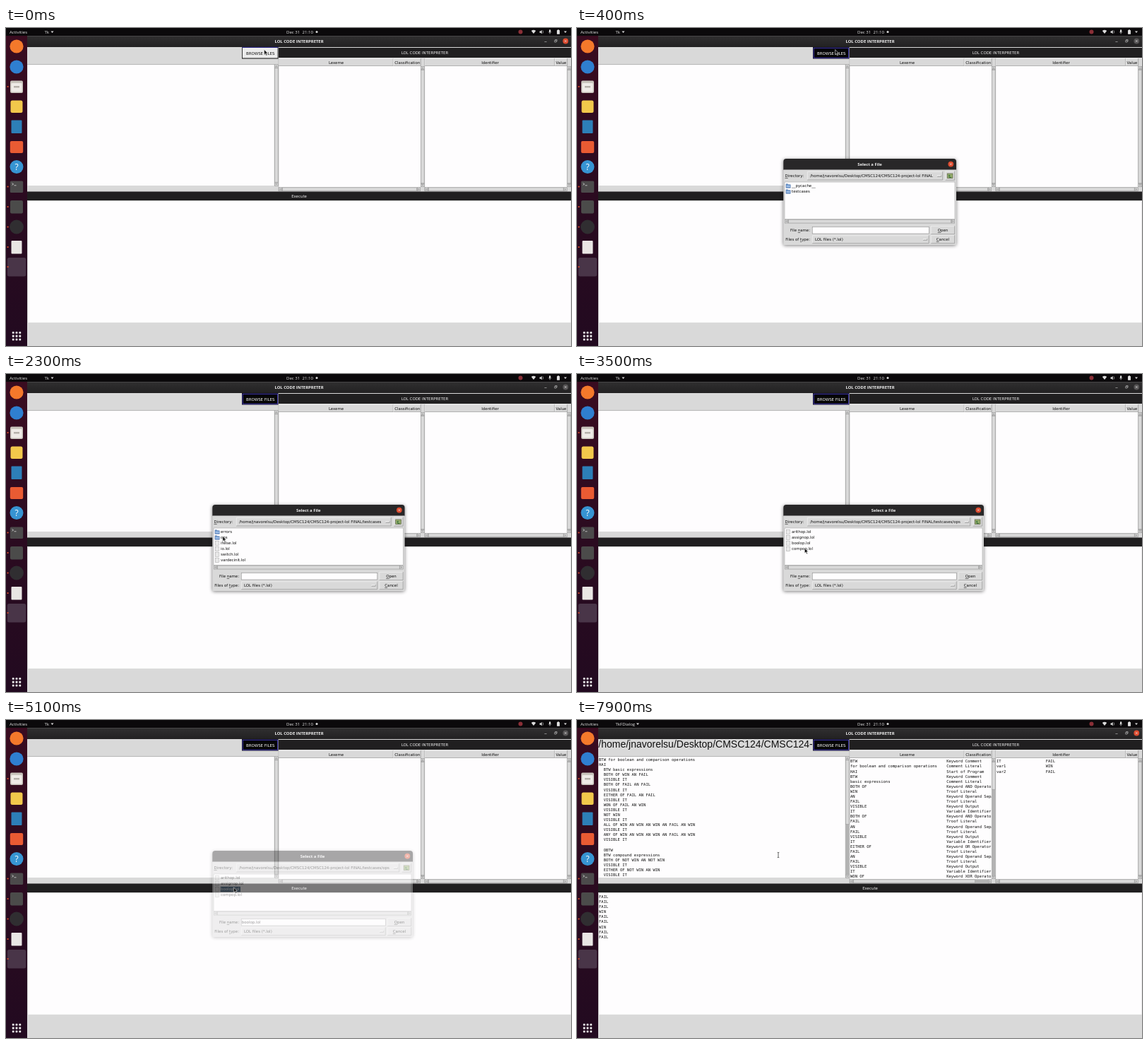
These frames come from a looping animation (800 by 450 pixels, 8000 ms). An HTML page:

```html
<!DOCTYPE html>
<html lang="en">
<head>
<meta charset="utf-8">
<title>Interpreter session</title>
<style>
html, body { margin: 0; width: 100%; height: 100%; overflow: hidden; background: #d9d9d9; }
svg { display: block; width: 800px; height: 450px; }
text { white-space: pre; font-family: "DejaVu Sans", sans-serif; font-size: 5.45px; }
.shell { font-family: "Open Sans", sans-serif; font-size: 6.1px; }
.bold { font-family: "Open Sans", sans-serif; font-size: 5.9px; font-weight: 700; }
.mono { font-family: "DejaVu Sans Mono", monospace; font-size: 5.52px; }
.big { font-family: "Liberation Sans", sans-serif; font-size: 14px; }
.help { font-family: "Open Sans", sans-serif; font-size: 12px; }
.u { text-decoration: underline; text-decoration-thickness: .5px; }
</style>
</head>
<body>
<svg id="stage" viewBox="0 0 800 450"></svg>
<script>
const LOOP = 8000, GREY = '#d9d9d9', DARK = '#201f20', PAPER = '#fefdfe', ROW = 7.087;
const HOME = '/home/jnavorelsu/Desktop/CMSC124/CMSC124-project-lol FINAL';

const rect = (x1, y1, x2, y2, fill, more = '') =>
  `<rect x="${x1}" y="${y1}" width="${x2 - x1}" height="${y2 - y1}" fill="${fill}" ${more}/>`;
const circle = (x, y, r, fill) => `<circle cx="${x}" cy="${y}" r="${r}" fill="${fill}"/>`;
const path = (d, stroke, width = .7, fill = 'none') =>
  `<path d="${d}" stroke="${stroke}" stroke-width="${width}" fill="${fill}"/>`;
const label = (x, y, s, fill = '#111', cls = '', anchor = 'start') =>
  `<text x="${x}" y="${y}" fill="${fill}" class="${cls}" text-anchor="${anchor}">${s}</text>`;
const mid = (x, y, s, fill, cls) => label(x, y, s, fill, cls, 'middle');
const lines = (x, y, list) => list.map((s, i) => label(x, y + i * ROW, s, '#111', 'mono')).join('');
const underline = s => s.replace(/_(.)/, '<tspan class="u">$1</tspan>');

// Raised grey box
const bevel = (x1, y1, x2, y2) => rect(x1, y1, x2, y2, GREY) +
  path(`M${x1} ${y2 - .3}H${x2 - .3}V${y1}`, '#858585', .6) +
  path(`M${x1 + .3} ${y2 - .6}V${y1 + .3}H${x2 - .6}`, '#f6f6f6', .6);

// Scrollbars: the thumb runs from the first arrow to `end`
const part = (x1, y1, x2, y2) => rect(x1 + .3, y1 + .3, x2 - .3, y2 - .3, GREY, 'stroke="#999" stroke-width=".6"');
const vbar = (x, y1, y2, end = y2 - 5) => rect(x, y1, x + 5.5, y2, '#b3b3b3') +
  part(x, y1, x + 5.5, y1 + 5) + part(x, y2 - 5, x + 5.5, y2) + part(x, y1 + 5, x + 5.5, end) +
  path(`M${x + 1.5} ${y1 + 3.3}l1.3 -1.6 1.3 1.6zM${x + 1.5} ${y2 - 3.3}l1.3 1.6 1.3 -1.6z`, '#666', .4);
const hbar = (y, x1, x2, end = x2 - 5) => rect(x1, y, x2, y + 5.5, '#b3b3b3') +
  part(x1, y, x1 + 5, y + 5.5) + part(x2 - 5, y, x2, y + 5.5) + part(x1 + 5, y, end, y + 5.5) +
  path(`M${x1 + 3.2} ${y + 1.5}l-1.6 1.3 1.6 1.3zM${x2 - 3.2} ${y + 1.5}l1.6 1.3 -1.6 1.3z`, '#666', .4);

const caret = x => `<path d="M${x - 2} 4.6h4l-2 2.4z" fill="#ddd"/>`;
const closeButton = (x, y, fill = '#dd4b2f') => circle(x, y, 3.9, fill) +
  path(`M${x - 1.3} ${y - 1.3}l2.6 2.6m0 -2.6l-2.6 2.6`, '#eee', .7);

function dock() {
  const dots = [83, 224.5, 253, 281.5, 310, 338].map(y => circle(2.6, y, 1.1, '#e2502e')).join('');
  let grid = '';
  for (let i = 0; i < 9; i++) {
    const x = 8.8 + i % 3 * 4.8, y = 429.8 + Math.floor(i / 3) * 4.8;
    grid += rect(x, y, x + 2.8, y + 2.8, '#eee', 'rx=".6"');
  }
  return rect(0, 11, 30, 450, 'url(#dock)') +
    circle(15, 26, 9.6, '#f4792b') +
    circle(15, 55, 9.6, '#2f7fd0') +
    rect(6, 74.5, 24, 92, '#c9c4bc', 'rx="2"') + rect(7.5, 78, 22.5, 90.5, '#efebe7', 'rx="1"') + rect(11, 82, 19, 84.5, '#b5b0aa') +
    rect(6.5, 102.5, 23.5, 120, '#f2c84b', 'rx="2.5"') +
    rect(7.5, 130.5, 22.5, 149, '#2d7fb8', 'rx="1"') +
    rect(5.8, 160, 24.2, 177, '#e95b33', 'rx="2"') +
    circle(15, 196.5, 9.5, '#3794d2') + mid(15, 200.8, '?', '#fff', 'help') +
    rect(5.8, 216.5, 24.2, 233, '#4c4a4b', 'rx="1.5"') + path('M8.5 219.5l2 1.4 -2 1.4M11.5 222.8h3', '#eee') +
    rect(6, 244, 24, 262.5, '#4b4b4a', 'rx="2"') +
    circle(15, 281.5, 9.9, '#302e31') +
    rect(7.5, 301, 22.5, 319.5, '#e9e6e4', 'rx="1"') +
    rect(1.8, 325, 28.2, 351.5, '#493548', 'rx="2.5"') + dots + grid;
}

const topBar = () => rect(0, 0, 800, 11.5, '#0b090b') + label(5, 7.8, 'Activities', '#e6e6e6', 'shell') +
  '<g id="app"></g>' + label(397, 7.8, 'Dec 31  21:10', '#e6e6e6', 'shell') + circle(440, 5.4, 1.5, '#ddd') +
  circle(728.5, 5.5, 3, '#8a2f37') +
  '<path d="M743.8 4q3.2 -2.4 6.4 0l-3.2 4z" fill="#ddd"/>' +
  '<path d="M755.5 4.5h1.4l1.8 -1.6v5.4l-1.8 -1.6h-1.4z" fill="#ddd"/>' + path('M760 3.5q1.4 2 0 4', '#ddd', .6) +
  rect(769, 2.3, 771.2, 6.3, '#ddd', 'rx="1"') + path('M768 5.2q2.1 4 4.2 0M770.1 7v1.5', '#ddd', .5) +
  rect(780, 3, 784, 8.7, '#ddd', 'rx=".5"') + rect(781.2, 2.2, 782.8, 3, '#ddd') + caret(792);

const titleBar = () => rect(30, 11.5, 800, 27, 'url(#title)') + mid(415, 20.8, 'LOL CODE INTERPRETER', '#f0f0f0', 'bold') +
  path('M762.4 19.5h3.2M776.7 17.6h2.4v2.4h-2.4zM777.7 17.4v-.9h2.4v2.4h-.9', '#c8c8c8', .6) + '<g id="close"></g>';

function panes() {
  const header = (x1, x2) => bevel(x1, 43, x2, 54);
  return rect(30, 27, 800, 450, GREY) + rect(30.5, 51.5, 379.5, 223, PAPER) + path('M30 51.6H380', '#8d8d8d', .6) +
    rect(386, 28, 800, 42, DARK) + mid(593, 37.2, 'LOL CODE INTERPRETER', '#eee') +
    header(386, 548.5) + header(548.5, 587.5) + header(593, 777) + header(777, 795) +
    mid(467.5, 50.7, 'Lexeme') + mid(568.3, 50.7, 'Classification') + mid(685.5, 50.7, 'Identifier') + mid(786, 50.7, 'Value') +
    rect(386, 54, 587, 225, PAPER) + rect(593, 54, 794.5, 225, PAPER) +
    path('M386 43V231M592.7 43V231', '#999', .5) +
    '<g id="bars"></g>' + vbar(794.5, 54, 225) + hbar(225.5, 593, 794.5) +
    rect(30, 231.5, 800, 244, DARK) + mid(415, 240.1, 'Execute', '#eee') +
    rect(30.5, 245, 799.5, 416.8, PAPER) + path('M30.3 417V245', '#aaa', .5);
}

const bars = full => full
  ? vbar(380, 51.5, 223.5, 148) + vbar(587, 54, 225, 98.5) + hbar(225.5, 386, 587, 564)
  : vbar(380, 51.5, 223.5) + vbar(587, 54, 225) + hbar(225.5, 386, 587);

const browse = hot => rect(334, 27, 385.5, 43.5, '#0a0a0a') + (hot
  ? rect(334.8, 28, 384.6, 42.5, '#ececec') + path('M334 27.4H385.5', '#3530a8', .9)
  : rect(335.2, 28.3, 384.6, 42.3, '#060606', 'stroke="#4038b4"')) +
  mid(360.2, 37.5, 'BROWSE FILES', hot ? '#111' : '#fff');

const CODE = `BTW for boolean and comparison operations
HAI
  BTW basic expressions
  BOTH OF WIN AN FAIL
  VISIBLE IT
  BOTH OF FAIL AN FAIL
  VISIBLE IT
  EITHER OF FAIL AN FAIL
  VISIBLE IT
  WON OF FAIL AN WIN
  VISIBLE IT
  NOT WIN
  VISIBLE IT
  ALL OF WIN AN WIN AN WIN AN FAIL AN WIN
  VISIBLE IT
  ANY OF WIN AN WIN AN WIN AN FAIL AN WIN
  VISIBLE IT

  OBTW
  BTW compound expressions
  BOTH OF NOT WIN AN NOT WIN
  VISIBLE IT
  EITHER OF NOT WIN AN WIN
  VISIBLE IT`.split('\n');
const LEXEMES = ('BTW,for boolean and comparison operations,HAI,BTW,basic expressions,BOTH OF,WIN,AN,FAIL,VISIBLE,IT,' +
  'BOTH OF,FAIL,AN,FAIL,VISIBLE,IT,EITHER OF,FAIL,AN,FAIL,VISIBLE,IT,WON OF').split(',');
const KINDS = {
  BTW: 'Keyword Comment', HAI: 'Start of Program', 'BOTH OF': 'Keyword AND Operator', 'EITHER OF': 'Keyword OR Operator',
  'WON OF': 'Keyword XOR Operator', WIN: 'Troof Literal', FAIL: 'Troof Literal', AN: 'Keyword Operand Separator',
  VISIBLE: 'Keyword Output', IT: 'Variable Identifier'
};
const results = () => `<g clip-path="url(#pathClip)">${label(30.3, 38.6, HOME, '#111', 'big')}</g>` +
  lines(31, 58, CODE) + lines(387, 60.4, LEXEMES) +
  `<g clip-path="url(#kindClip)">${lines(523.2, 60.4, LEXEMES.map(s => KINDS[s] || 'Comment Literal'))}</g>` +
  lines(594, 60.4, ['IT', 'var1', 'var2']) + lines(663.7, 60.4, ['FAIL', 'WIN', 'FAIL']) +
  lines(31, 252, 'FAIL FAIL FAIL WIN FAIL FAIL WIN FAIL FAIL'.split(' '));

const FOLDERS = {
  root: { right: 537, path: HOME, rows: ['__pycache__', 'testcases'] },
  tests: { right: 564.5, path: HOME + '/testcases', rows: ['errors', 'ops', 'ifelse.lol', 'io.lol', 'switch.lol', 'vardecinit.lol'] },
  ops: { right: 576, path: HOME + '/testcases/ops', rows: ['arithop.lol', 'assignop.lol', 'boolop.lol', 'compop.lol'] }
};

function fileRow(name, i, picked) {
  const y = 223.5 + i * 8, isFile = name.endsWith('.lol');
  const icon = isFile
    ? rect(296.3, y - 3, 301.3, y + 3, '#f4f4f4', 'stroke="#a2a2a2" stroke-width=".6"') + path(`M297.5 ${y - 1}h2.7m-2.7 2h2.7`, '#bbb', .5)
    : `<path d="M296 ${y - 2.7}h2.5l.8 1h2.9v4.4h-6.2z" fill="#6f9bd1" stroke="#3a5f94" stroke-width=".5"/>` + rect(296.6, y - .4, 301.8, y + 1.3, '#a9c6ea');
  const width = name.length * 2.75;
  return icon + (picked ? rect(303.6, y - 3.7, 304.4 + width, y + 3.7, '#4a6984') : '') +
    label(304, y + 1.8, name, picked ? '#fff' : '#111');
}

function dialog(key, picked) {
  const { right: r, path: dir, rows } = FOLDERS[key];
  const chosen = rows[picked] && rows[picked].endsWith('.lol') ? rows[picked] : '';
  const button = (y, s) => bevel(r - 36, y, r - 2, y + 12) + mid(r - 19, y + 8, underline(s));
  return rect(292, 186, r, 308, '#000', 'rx="3" opacity=".5" filter="url(#blur)"') +
    `<path d="M292.3 201v-12q0 -4 4 -4H${r - 4}q4 0 4 4v12z" fill="#282728"/>` + rect(292.3, 200.5, r, 307, GREY) +
    mid((292 + r) / 2, 195.2, 'Select a File', '#f2f2f2', 'bold') + closeButton(r - 7.7, 192.6) +
    label(294.5, 211, underline('_Directory:')) + bevel(326, 203, r - 19, 215.3) + label(330, 211, dir) + bevel(r - 27, 208.3, r - 21, 210.7) +
    bevel(r - 15.5, 202.5, r - 2, 215.5) + rect(r - 12.8, 206, r - 5, 212.5, '#93ab6b', 'stroke="#50553a" stroke-width=".6"') +
    path(`M${r - 7} 211.5h-2.8v-3.3m-1.3 1.3l1.3 -1.4 1.3 1.4`, '#2f6b35', .9) +
    rect(294, 218, r - 2, 270.5, PAPER, 'stroke="#9a9a9a" stroke-width=".5"') + rows.map((s, i) => fileRow(s, i, i === picked)).join('') +
    hbar(270.8, 294, r - 2) +
    label(330, 288, underline('File _name:'), '#111', '', 'end') + rect(333.2, 281.3, r - 38.7, 291, PAPER, 'stroke="#898989" stroke-width=".6"') +
    label(333.8, 288, chosen) + button(280, '_Open') +
    label(330, 301, underline('Files of _type:'), '#111', '', 'end') + bevel(333, 293.5, r - 38.5, 305) +
    label(337, 301, 'LOL files (*.lol)') + bevel(r - 47, 298.2, r - 41, 300.6) + button(293, '_Cancel');
}

const ARROW = '<path d="M0 0V7.2L1.7 5.7 2.9 8.4 4.1 7.9 2.9 5.3H5.1Z" fill="#111" stroke="#fff" stroke-width=".5"/>';
const IBEAM = path('M-1.3 -3.7q1.3 0 1.3 .8V2.9q0 .8 -1.3 .8M1.3 -3.7q-1.3 0 -1.3 .8M0 2.9q0 .8 1.3 .8', '#222', .7);

// [start ms, folder, picked row, dialog opacity]
const SCENES = [
  [0], [200, 'root', -1, .6], [300, 'root', -1, 1], [1300, 'root', 1, 1], [1500, 'tests', -1, 1],
  [2600, 'tests', 1, 1], [2800, 'ops', -1, 1], [4300, 'ops', 2, 1], [5100, 'ops', 2, .4], [5200], [5600]
];
// [ms, x, y]
const POINTER = [
  [0, 365.5, 30.5], [400, 365.5, 30.5], [900, 325, 213], [1100, 322, 228.5], [1500, 322, 228.5], [2100, 308, 229.5],
  [2300, 306.8, 229.5], [2900, 306.8, 229.5], [3400, 321.5, 245], [3500, 322.3, 246.3], [3600, 322.3, 246.3],
  [4000, 322.3, 236.8], [7800, 322.3, 236.8], [7900, 285, 191]
];

document.getElementById('stage').innerHTML = `<defs>
  <linearGradient id="dock" x2="0" y2="1"><stop stop-color="#3a0c20"/><stop offset=".5" stop-color="#2b0b20"/><stop offset="1" stop-color="#220a20"/></linearGradient>
  <linearGradient id="title" x2="0" y2="1"><stop stop-color="#302f30"/><stop offset="1" stop-color="#222122"/></linearGradient>
  <clipPath id="pathClip">${rect(30, 27, 333.5, 44)}</clipPath>
  <clipPath id="kindClip">${rect(520, 54, 587, 225)}</clipPath>
  <filter id="blur" x="-10%" y="-15%" width="120%" height="130%"><feGaussianBlur stdDeviation="2.8"/></filter>
</defs>${panes()}${titleBar()}${topBar()}${dock()}
<g id="browse"></g><g id="results">${results()}</g><g id="dialog"></g><g id="pointer"></g>`;

const $ = id => document.getElementById(id);

function setScene([start, folder, picked, opacity]) {
  const loaded = start >= 5600, returned = start >= 5200, name = returned ? 'TkFDialog' : 'Tk';
  $('app').innerHTML = label(54.5, 7.8, name, '#e6e6e6', 'shell') + caret(returned ? 86 : 65.5);
  $('close').innerHTML = closeButton(792.3, 18.5, folder ? '#565455' : undefined);
  $('bars').innerHTML = bars(loaded);
  $('browse').innerHTML = browse(start < 200);
  $('dialog').innerHTML = folder ? dialog(folder, picked) : '';
  $('dialog').setAttribute('opacity', opacity || 1);
  $('results').setAttribute('visibility', loaded ? 'visible' : 'hidden');
}

function pointerAt(t) {
  const i = POINTER.findIndex(p => p[0] > t);
  if (i < 0) return POINTER[POINTER.length - 1].slice(1);
  const [a, b] = [POINTER[i - 1], POINTER[i]], k = (t - a[0]) / (b[0] - a[0]);
  return [1, 2].map(j => a[j] + (b[j] - a[j]) * k);
}

let scene, beam;
function draw(now) {
  const t = Math.floor(now % LOOP / 100) * 100;
  const next = SCENES.filter(s => s[0] <= t).pop();
  if (next !== scene) setScene(scene = next);
  if (beam !== t >= 7900) {
    beam = t >= 7900;
    $('pointer').innerHTML = beam ? IBEAM : ARROW;
  }
  $('pointer').setAttribute('transform', `translate(${pointerAt(t)})`);
}

let origin;
function tick(now) {
  origin ??= now;
  draw(now - origin);
  requestAnimationFrame(tick);
}
draw(0);
requestAnimationFrame(tick);
</script>
</body>
</html>
```
